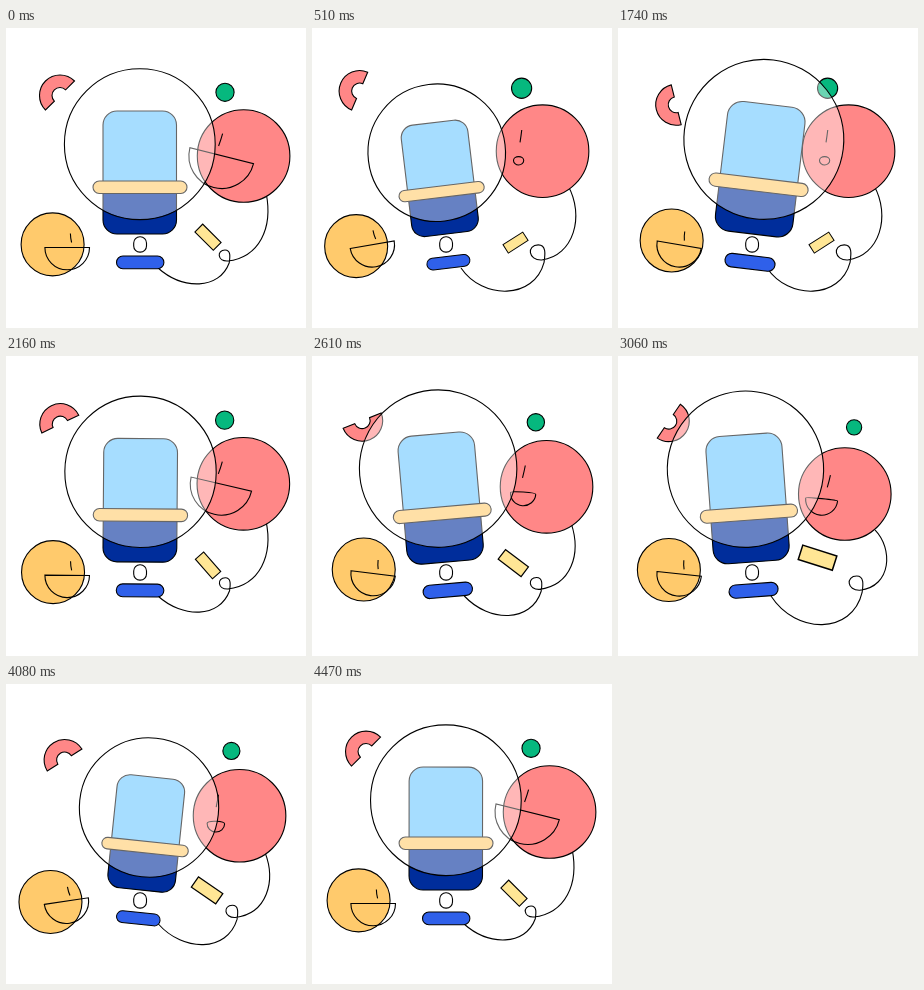
Write an HTML page that moves like this. It is 300 px wide and 300 px high and loops after 4.5 s.

```html
<!DOCTYPE html>
<html lang="en">
<head>
<meta charset="utf-8">
<title>Abstract shapes</title>
<style>
  html, body { margin: 0; width: 100%; height: 100%; overflow: hidden; background: #fff; }
  svg { display: block; width: 100%; height: 100%; }
  #jar * { vector-effect: non-scaling-stroke; }
</style>
</head>
<body>
<svg viewBox="0 0 300 300" fill="none" stroke="#000" stroke-width="1.1">
  <defs>
    <clipPath id="lower"><rect x="90" y="160" width="90" height="50"/></clipPath>
  </defs>
  <path id="string"/>
  <circle id="green" fill="#06b87e"/>
  <circle id="red" r="46.3" fill="#ff8787"/>
  <path id="redEye"/>
  <path id="redMouth"/>
  <path id="arc" fill="#ff8787" d="M-20.5 0A20.5 20.5 0 0 1 20.5 0H8A8 8 0 0 0 -8 0Z"/>
  <rect id="chip" x="-13" y="-5.5" width="26" height="11" fill="#ffe695"/>
  <circle id="face" r="31.5" fill="#ffca6c"/>
  <g id="smile">
    <path d="M-22.3 0H22.3A22.3 22.3 0 0 1 -22.3 0Z"/>
    <path d="M3.2 -14Q3.3 -9 4.4 -5"/>
  </g>
  <rect id="pill" x="-23.7" y="-6.4" width="47.4" height="12.8" rx="6.4" fill="#2f60ea"/>
  <rect x="127.7" y="208.7" width="12.8" height="15.4" rx="6.2" fill="#fff"/>
  <g id="jar">
    <rect x="97" y="83" width="73.5" height="123" rx="14" fill="#6bc5ff" stroke="none"/>
    <rect x="97" y="83" width="73.5" height="123" rx="14" fill="#002d9b" stroke="none" clip-path="url(#lower)"/>
    <rect x="97" y="83" width="73.5" height="123" rx="14"/>
    <rect x="87" y="153" width="94" height="12.5" rx="6.2" fill="#ffca6c"/>
    <circle cx="133.8" cy="116.2" r="75.4" fill="#fff" fill-opacity=".4"/>
  </g>
</svg>
<script>
const LOOP = 4500;
const el = id => document.getElementById(id);
const mix = (a, b, p) => a + (b - a) * p;
// Smooth 0 → 1 → 0, repeated n times per loop
const pulse = (t, n) => (1 - Math.cos(2 * Math.PI * n * t / LOOP)) / 2;

const set = (id, attrs) => {
  for (const k in attrs) el(id).setAttribute(k, attrs[k]);
};
const place = (id, x, y, turn = 0, size = 1) =>
  set(id, { transform: `translate(${x} ${y}) rotate(${turn}) scale(${size})` });

// Half disc (shut = 0) that closes into a small ring (shut = 1)
function mouthPath(shut) {
  const w = mix(32.8, 4.5, shut), low = mix(32.8, 4, shut), top = 4 * shut ** 3;
  return `M${-w} 0A${w} ${low} 0 0 0 ${w} 0` +
    (top > .05 ? `A${w} ${top} 0 0 0 ${-w} 0Z` : 'Z');
}

// Cord from (x, y) through a small loop, then sagging to the pill
function cordPath(x, y, go) {
  const lx = go(219, 17, 20), ly = go(222, -12, -2), s = go(.85, .73, .25);
  const at = (dx, dy) => `${lx + dx * s} ${ly + dy * s}`;
  const sag = go(262, 23, 17), end = go(152, -7, 1);
  return `M${x} ${y}` +
    `C${x + go(7, 23, 11)} ${y + go(35, -11, -17)} ${lx + 3 * s + 32} ${ly + 13 * s - 4} ${at(3, 13)}` +
    `C${at(-9, 13.5)} ${at(-10, 0)} ${at(0, 0)}` +
    `C${at(7, 0)} ${at(6, 8)} ${at(5, 15)}` +
    `C${lx + 5 * s - 10} ${sag} ${end + go(25, -8, 0)} ${sag} ${end} 240`;
}

function draw(t) {
  const beat = pulse(t, 4), drift = pulse(t, 2);
  const quarter = Math.floor(4 * t / LOOP);
  const side = quarter % 2 ? 1 : -1;                    // left, right, left, right
  const up = quarter === 1 || quarter === 2;            // large in the middle of the loop

  // Slow drift goes one way in the first half, another in the second
  const a = quarter < 2 ? drift : 0, b = quarter < 2 ? 0 : drift * 1.2;
  const go = (home, da, db) => home + da * a + db * b;

  const tilt = 7 * side * beat;
  const size = 1 + (up ? .062 : -.09) * beat;
  set('jar', { transform: `translate(${134 + .7 * beat} 206) rotate(${tilt}) scale(${size}) translate(-134 -206)` });
  set('pill', { transform: `rotate(${tilt} 134 216) translate(134.2 234.4) scale(${size})` });

  place('face', 46.6 + (up ? 7.2 : -2.5) * beat, 216.4 + (up ? -4 : 1.8) * beat);
  place('smile', 61.2 - (up ? 0 : beat), 219.5 - 2.8 * beat, (up ? 10 : -10) * beat);

  place('arc',
    54 + 5.4 * side * beat - 2.5 * a,
    67.5 + (side > 0 ? 10 : -4) * beat - 1.2 * a,
    -45 + ((up ? 300 : 0) + 15 * side) * beat - 17 * a);

  set('green', { cx: go(219, -22, 17.4), cy: go(64.3, -9.5, 7.2), r: go(9.1, 2.3, -1.5) });

  const rx = go(237.6, -16.5, -11), ry = go(128, -11.2, 10.2);
  place('red', rx, ry);
  place('redMouth', rx + mix(-21.9, -24, beat), ry + mix(-.3, 9.4, beat), mix(14, 0, beat));
  set('redMouth', { d: mouthPath(beat) });
  const lean = mix(2, .8, beat ** 2);
  place('redEye', rx + go(-23, 10, 9) - 3 * beat, ry + go(-16, 2.6, 3.5));
  set('redEye', { d: `M${lean} -6.3Q${lean * .3} -1 ${-lean} 6` });

  place('chip', go(202, 3.6, -2.5), go(209.2, 12.6, -7.6), go(45, 240, -28), go(1, -.23, .38));
  set('string', { d: cordPath(rx + go(22.5, 7, 8), ry + go(37, -6, -1), go) });
}

let start;
function tick(now) {
  start ??= now;
  draw((now - start) % LOOP);
  requestAnimationFrame(tick);
}
draw(0);
requestAnimationFrame(tick);
</script>
</body>
</html>
```
